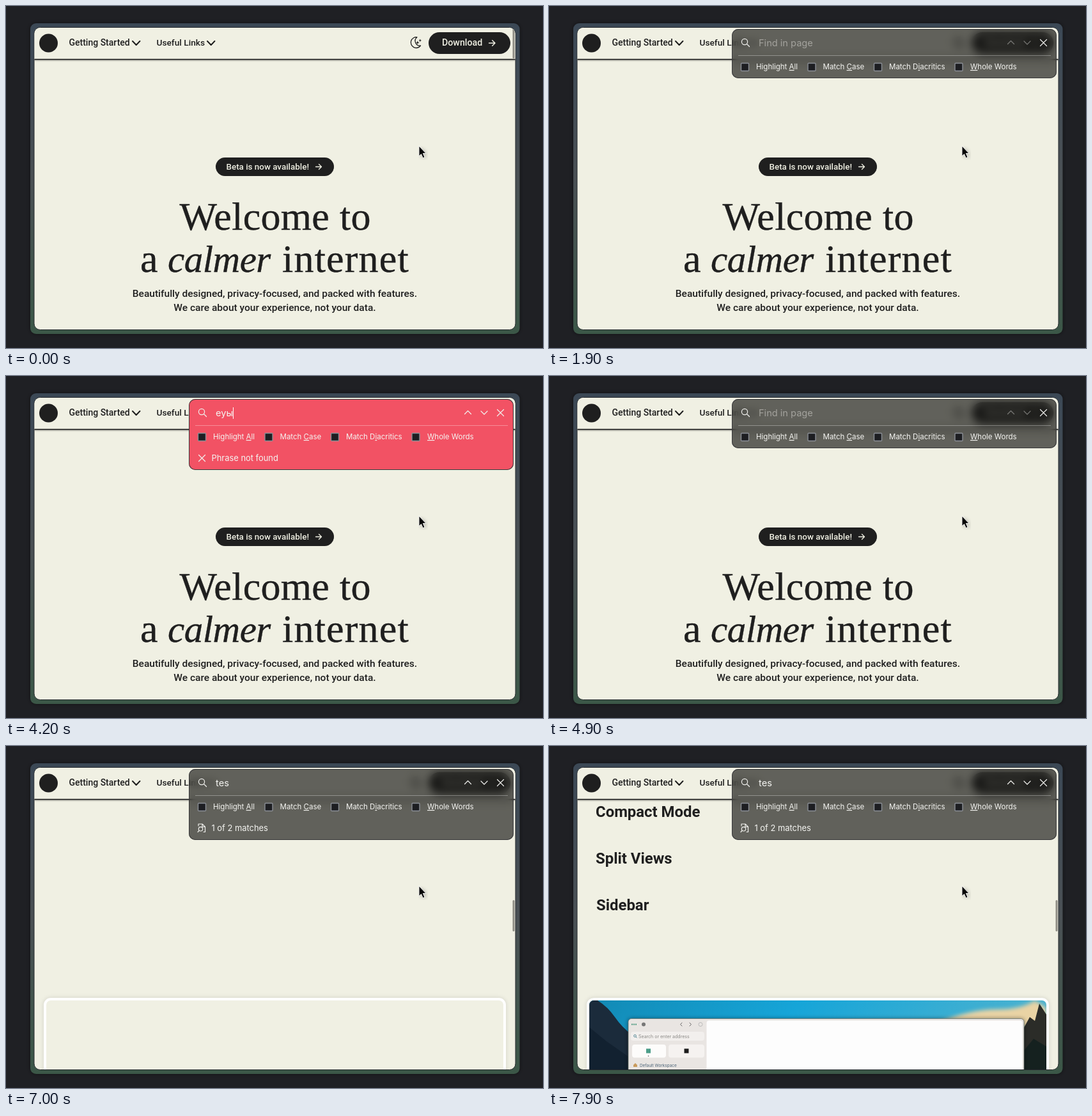
Write an HTML page that moves like this. It is 840x535 px and loops after 8 s.

```html
<!DOCTYPE html>
<html lang="en">
<head>
<meta charset="utf-8">
<title>Find in page</title>
<style>
  html, body { margin: 0; width: 840px; height: 535px; overflow: hidden; background: #1f2024; }
  svg { position: absolute; left: 0; top: 0; }
  #page text { font: 500 14px Roboto, sans-serif; fill: #1f1f1f; }
  #page .light { fill: #f0f0e3; }
  #page .title { font: 62px "Liberation Serif", serif; stroke: #1f1f1f; stroke-width: .4; }
  #page .lead { font-size: 15.5px; text-anchor: middle; }
  #page .topic { font-size: 23.9px; font-weight: 700; }
  #page .tiny { font: 7px Inter, sans-serif; fill: #8b8986; }
  .line { fill: none; stroke-linecap: round; stroke-linejoin: round; }
  #panel {
    position: absolute; left: 286px; top: 36px; width: 508px; height: 77px;
    border-radius: 10px; overflow: hidden; box-shadow: inset 0 0 0 1px #38383a;
    backdrop-filter: blur(7px); color: #f4f4f1;
  }
  #panel text { font: 11.5px Inter, sans-serif; fill: #f4f4f1; }
  #panel #status { font-size: 12.9px; }
  #panel tspan { text-decoration: underline; }
  #query { position: absolute; left: 42px; top: 11.5px; font: 14.6px/20px Inter, sans-serif; white-space: pre; }
  #caret { display: inline-block; width: 1px; height: 18px; margin-right: -1px; vertical-align: -4px; background: #fff; }
  #hint { color: #a3a29d; }
</style>
</head>
<body>
<svg id="page" width="840" height="535">
  <defs>
    <linearGradient id="rim" x2="0" y2="1">
      <stop stop-color="#3b4855"/><stop offset=".5" stop-color="#4a5054"/><stop offset="1" stop-color="#3b5747"/>
    </linearGradient>
    <linearGradient id="sky" x2="1" y2=".2">
      <stop stop-color="#1289b4"/><stop offset=".45" stop-color="#16a5d8"/><stop offset="1" stop-color="#4fb3cf"/>
    </linearGradient>
    <clipPath id="view"><rect x="44.5" y="34" width="752" height="472" rx="9"/></clipPath>
    <clipPath id="photoClip"><rect x="63" y="398" width="715" height="130" rx="7"/></clipPath>
    <filter id="soft"><feGaussianBlur stdDeviation="3"/></filter>
  </defs>

  <rect x="38" y="27" width="765.5" height="486" rx="9" fill="#0007" filter="url(#soft)"/>
  <rect x="38" y="27" width="765.5" height="486" rx="9" fill="url(#rim)"/>
  <rect x="44" y="33.5" width="753" height="473" rx="9.5" fill="#f0f0e3" stroke="#24282c"/>

  <g clip-path="url(#view)">
    <g id="hero">
      <rect x="328" y="237" width="185" height="29" rx="14.5" fill="#1f1f1f"/>
      <text class="light" x="344.5" y="256" style="font-size:13.4px">Beta is now available!</text>
      <path class="line" d="M484.5 251.5h9m-4-4 4 4-4 4" stroke="#f0f0e3" stroke-width="1.3"/>
      <text class="title" x="271.5" y="349.5" style="letter-spacing:.3px">Welcome to</text>
      <text class="title" x="210" y="416">a</text>
      <text class="title" x="253" y="416" style="font-style:italic;font-size:59px;letter-spacing:-.5px">calmer</text>
      <text class="title" x="432" y="416" style="letter-spacing:1.2px">internet</text>
      <text class="lead" x="420.5" y="455">Beautifully designed, privacy-focused, and packed with features.</text>
      <text class="lead" x="420.5" y="477">We care about your experience, not your data.</text>
    </g>

    <g id="features">
      <g id="topics">
        <text class="topic" x="73" y="111">Compact Mode</text>
        <text class="topic" x="73" y="184">Split Views</text>
        <text class="topic" x="74" y="256.5">Sidebar</text>
      </g>
      <g id="card">
        <rect x="59" y="394" width="723" height="140" rx="10" fill="#0002" filter="url(#soft)"/>
        <rect x="61" y="396" width="719" height="140" rx="9" fill="#f0f0e3" stroke="#fff" stroke-width="4"/>
      </g>
      <g id="photo" clip-path="url(#photoClip)">
        <rect x="63" y="398" width="715" height="130" fill="url(#sky)"/>
        <path d="M610 432Q660 412 700 412T760 398L778 410V440H610Z" fill="#e9d3a4" filter="url(#soft)"/>
        <path d="M63 398H76Q92 408 103 424T130 452V528H63Z" fill="#1b2b3b"/>
        <path d="M63 440L90 462 130 490V528H63Z" fill="#122130"/>
        <path d="M740 446L752 424 760 430 767 403 778 420V528H736Z" fill="#2b2c28"/>
        <path d="M740 480L758 458 778 470V528H740Z" fill="#15211f"/>
        <rect x="123" y="426" width="621" height="110" rx="6" fill="#0006" filter="url(#soft)"/>
        <rect x="124" y="426.5" width="619" height="110" rx="5" fill="#e9e5e2" stroke="#65716b" stroke-width=".8"/>
        <rect x="246.5" y="429.5" width="494" height="110" rx="4" fill="#fdfdfd"/>
        <path d="M129 435.5h2m1 0h2m1 0h2" stroke="#4c9a80" stroke-width="2"/>
        <circle cx="148" cy="435.5" r="3" fill="#777"/>
        <path class="line" d="M208 433l-2.5 2.5 2.5 2.5M220 433l2.5 2.5-2.5 2.5" stroke="#666"/>
        <circle cx="237" cy="435.5" r="3" fill="none" stroke="#bbb"/>
        <rect x="128" y="447" width="115" height="14" rx="4" fill="#f2efed"/>
        <circle cx="134.5" cy="453.5" r="1.8" fill="none" stroke="#4b8290"/>
        <path d="M136 455l1.5 1.5" stroke="#4b8290"/>
        <text class="tiny" x="140" y="456.5">Search or enter address</text>
        <rect x="130" y="467" width="53" height="20.5" rx="4" fill="#fdfcfb"/>
        <rect x="187" y="467" width="56" height="20.5" rx="4" fill="#f5f2f0"/>
        <rect x="152" y="473.5" width="7" height="7" fill="#4b9d88"/>
        <rect x="211.5" y="473.5" width="7" height="7" fill="#1c1c1c"/>
        <circle cx="155.5" cy="485" r=".8" fill="#555"/>
        <path d="M132 499l3-3 3 3v3h-6Z" fill="#c99b5d"/>
        <text class="tiny" x="142" y="501.5" style="font-size:6.4px;fill:#4b6377">Default Workspace</text>
      </g>
    </g>

    <rect x="44" y="79" width="753" height="7" fill="#0003" filter="url(#soft)"/>
    <rect x="44" y="33" width="753" height="50" fill="#f0f0e3"/>
    <rect x="44" y="82.7" width="753" height="1.8" fill="#1f1f1f"/>
    <circle cx="66.5" cy="58" r="14.5" fill="#1f1f1f"/>
    <rect id="mark" x="172" y="49" width="13" height="17" fill="#4cf18c"/>
    <text x="98.5" y="62">Getting Star<tspan id="hit">te</tspan>d</text>
    <text x="235.5" y="62" style="font-size:13.7px">Useful Links</text>
    <path class="line" d="M198 55l5.7 6 5.7-6M315 55l5.7 6 5.7-6" stroke="#1f1f1f" stroke-width="2"/>
    <path class="line" d="M643 48.8A8.4 8.4 0 1 0 648.5 62A7.4 7.4 0 0 1 643 48.8Z" stroke="#1f1f1f" stroke-width="1.3"/>
    <path d="M643.8 54.500l.8 2 2 .8-2 .8-.8 2-.8-2-2-.8 2-.8ZM647.800 51.500l.7 1.700 1.700.7-1.700.7-.7 1.700-.7-1.700-1.700-.7 1.700-.7Z" fill="#1f1f1f"/>
    <rect x="661" y="41" width="128" height="34" rx="17" fill="#1f1f1f"/>
    <text class="light" x="682" y="62" style="font-size:14.2px">Download</text>
    <path class="line" d="M755.5 58h9.5m-4.3-4.3 4.3 4.3-4.3 4.3" stroke="#f0f0e3" stroke-width="1.4"/>
    <rect id="thumb" x="792.5" width="3" rx="1.5" fill="#8f8d85"/>
  </g>
  <path d="M647 221l1 14.5 3.2-2.8 2.6 6 2.9-1.3-2.6-5.8h4.2Z" fill="#0005" filter="url(#soft)"/>
  <path d="M646 219v15.8l3.5-3.1 2.7 6 2.8-1.2-2.7-5.9h4.7Z" fill="#050505" stroke="#fff" stroke-width=".9"/>
</svg>

<div id="panel">
  <svg width="508" height="112" viewBox="286 36 508 112">
    <path d="M296 77.5H785" stroke="#fff5"/>
    <g class="line" stroke="#f0f0ed" stroke-width="1.2">
      <circle cx="306" cy="56" r="4.6"/>
      <path d="M309.5 59.5l4 4M768.5 52.5l10 10m0-10-10 10"/>
      <path id="arrows" d="M717.5 59.5l5-5 5 5M743 55l5 5 5-5"/>
      <path id="cross" d="M301.5 123.5l10 10m0-10-10 10"/>
      <g id="sheet">
        <path d="M301 125v-3h6l4.5 4.5v8h-2.5M307 122v4.5h4.5M300 134.5l2-2"/>
        <circle cx="304.5" cy="129.8" r="3.2"/>
      </g>
    </g>
    <g id="boxes" fill="#1d1e22" stroke="#8b8f96" stroke-width="1.4"></g>
    <text x="324" y="99">Highlight <tspan>A</tspan>ll</text>
    <text x="428.5" y="99">Match <tspan>C</tspan>ase</text>
    <text x="532" y="99">Match D<tspan>i</tspan>acritics</text>
    <text x="659" y="99"><tspan>W</tspan>hole Words</text>
    <text id="status" x="321.5" y="133"></text>
  </svg>
  <div id="query"><span id="typed"></span><i id="caret"></i><span id="hint">Find in page</span></div>
</div>

<script>
const LOOP = 8000;
const JUMP = 6700;
const $ = id => document.getElementById(id);
const show = (id, on) => $(id).style.display = on ? 'inline' : 'none';
const ramp = (t, from, to) => Math.min(1, Math.max(0, (t - from) / (to - from)));
const easeOut = p => 1 - (1 - p) ** 3;
const latest = (steps, t) => steps.filter(s => s[0] <= t).pop()[1];

// The Cyrillic letters are typed with the wrong keyboard layout, then deleted.
const typing = [[0, ''], [2600, 'е'], [3100, 'еу'], [3200, 'еуы'], [3300, 'еуые'], [4200, 'еуы'],
  [4400, 'еу'], [4500, 'е'], [4700, ''], [5500, 't'], [5700, 'te'], [6600, 'tes']];
const results = [[0, ''], [2700, 'Phrase not found'], [4700, ''], [5600, '1 of 76 matches'],
  [5700, '1 of 12 matches'], [6700, '1 of 2 matches']];
const caretOff = [[1700, 2200], [4900, 5500], [5900, 6300], [6900, 7400], [7900, 8000]];

$('boxes').innerHTML = [300.5, 405, 508.5, 635].map(x =>
  `<rect x="${x}" y="89.5" width="12" height="12" rx="1"/>`).join('');

function drawPage(t) {
  const jumped = t >= JUMP;
  show('hero', !jumped);
  show('features', jumped);
  $('card').style.opacity = ramp(t, JUMP, 6950);
  $('photo').style.opacity = ramp(t, 7350, 7800);
  [...$('topics').children].forEach((topic, i) => {
    const p = easeOut(ramp(t, 7050 + i * 150, 7600 + i * 150));
    topic.style.opacity = p;
    topic.setAttribute('transform', `translate(${12 * (1 - p)} 0)`);
  });
  const marked = t >= 5700 && t < JUMP;
  show('mark', marked);
  $('hit').style.fill = marked ? '#fff' : '';
  const thumb = $('thumb');
  thumb.setAttribute('y', jumped ? 241 : 35);
  thumb.setAttribute('height', jumped ? 49 : 47);
  thumb.style.opacity = jumped ? 1 : 1 - ramp(t, 50, 250);
}

function drawPanel(t) {
  const open = easeOut(ramp(t, 650, 1150));
  const text = latest(typing, t), status = latest(results, t);
  const missing = status.startsWith('Phrase');
  Object.assign($('panel').style, {
    display: open ? 'block' : 'none',
    opacity: open,
    transform: open < 1 ? `translateY(${-12 * (1 - open)}px)` : 'none',
    height: status ? '111px' : '77px',
    background: missing ? '#f25264' : 'rgba(24,23,20,.66)'
  });
  $('typed').textContent = text;
  $('status').textContent = status;
  $('caret').style.opacity = caretOff.some(([a, b]) => t >= a && t < b) ? 0 : 1;
  $('arrows').style.opacity = text ? 1 : .4;
  show('hint', !text);
  show('cross', missing);
  show('sheet', status && !missing);
}

function frame(now) {
  const t = now % LOOP;
  drawPage(t);
  drawPanel(t);
  requestAnimationFrame(frame);
}
frame(0);
</script>
</body>
</html>
```
